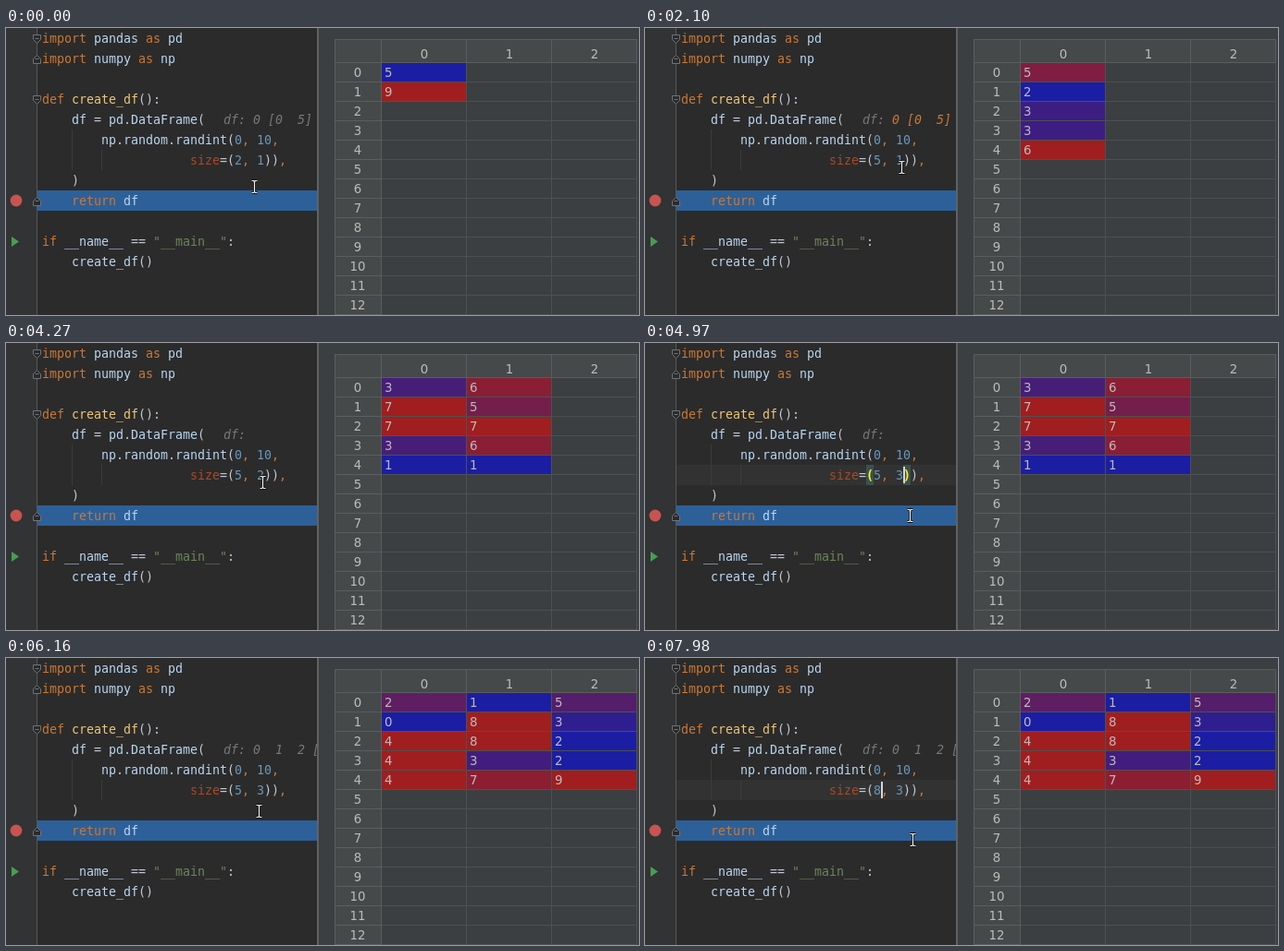
An HTML page that plays this animation: 684x311 px, repeating every 8000 ms.

```html
<!DOCTYPE html>
<html lang="en">
<head>
<meta charset="utf-8">
<title>DataFrame viewer</title>
<style>
  html, body { margin: 0; width: 100%; height: 100%; overflow: hidden; background: #3c3f41; }
  svg { display: block; }
  text { white-space: pre; }
  .code { font: 13.288px "DejaVu Sans Mono", monospace; }
  .hint { font-style: italic; }
  .table { font: 13.33px "DejaVu Sans", sans-serif; fill: #bbbbbb; }
  .mid { text-anchor: middle; }
</style>
</head>
<body>
<svg id="stage" width="684" height="311" viewBox="0 0 684 311"></svg>
<script>
const LOOP = 8000, STEP = 70;
const LEFT = 39, CHAR = 8, LINE = 22;
const COL = 92, ROW = 21, TABLE_X = 406, TABLE_Y = 38;
const C = {
  key: '#cc7832', name: '#b9d7f1', punct: '#c3cad3', num: '#6897bb',
  func: '#f0c674', arg: '#aa4926', str: '#6a8759', hint: '#787878', brace: '#ffef28'
};
const stage = document.getElementById('stage');

function add(tag, attrs, parent = stage) {
  const el = document.createElementNS('http://www.w3.org/2000/svg', tag);
  for (const k in attrs) el.setAttribute(k, attrs[k]);
  return parent.appendChild(el);
}
const rect = (x, y, width, height, fill, parent) => add('rect', { x, y, width, height, fill }, parent);
const path = (d, stroke, fill = 'none', width = 1, parent) =>
  add('path', { d, stroke, fill, 'stroke-width': width }, parent);
function label(x, y, str, cls, fill, parent) {
  const el = add('text', { x, y, class: cls }, parent);
  if (fill) el.setAttribute('fill', fill);
  el.textContent = str;
  return el;
}
const show = (el, on) => el.setAttribute('visibility', on ? 'visible' : 'hidden');
const lineTop = row => row * LINE;
const colX = col => LEFT + col * CHAR;

// Editor background
rect(0, 0, 337, 311, '#2b2b2b');
rect(0, 0, 33, 311, '#313335');
rect(33, 0, 1, 311, '#555759');
const activeLine = rect(34, lineTop(6), 303, LINE, '#323232');
rect(34, lineTop(8), 303, LINE, '#2d6099');
rect(71, lineTop(5), 1, LINE * 2, '#3b3b3b');
rect(103, lineTop(6), 1, LINE, '#3b3b3b');
const braceBoxes = [25, 30].map(c => rect(colX(c), lineTop(6), CHAR, LINE, '#3b514d'));
const selection = rect(0, lineTop(6), CHAR, LINE, '#214283');

// Gutter icons
function fold(row, dir) {
  const y = row * LINE + 12;
  path(`M29.5 ${y - 4.5 * dir}h8v${5 * dir}l-4 ${4 * dir}l-4 ${-4 * dir}z`, '#707376', '#2b2b2b');
  path(`M31.5 ${y - 0.5}h4`, '#707376');
}
fold(0, 1); fold(1, -1); fold(3, 1); fold(8, -1);
add('circle', { cx: 11, cy: 187, r: 6.4, fill: '#c75450' });
path('M6 226L14 231.5L6 237Z', 'none', '#499c54');

// Code: alternating colour name and text
function code(row, col, ...parts) {
  const made = [];
  for (let i = 0; i < parts.length; i += 2) {
    made.push(label(colX(col), lineTop(row) + 16, parts[i + 1], 'code', C[parts[i]]));
    col += parts[i + 1].length;
  }
  return made;
}
code(0, 0, 'key', 'import ', 'name', 'pandas ', 'key', 'as ', 'name', 'pd');
code(1, 0, 'key', 'import ', 'name', 'numpy ', 'key', 'as ', 'name', 'np');
code(3, 0, 'key', 'def ', 'func', 'create_df', 'punct', '():');
code(4, 4, 'name', 'df ', 'punct', '= ', 'name', 'pd', 'punct', '.', 'name', 'DataFrame', 'punct', '(');
code(5, 8, 'name', 'np', 'punct', '.', 'name', 'random', 'punct', '.', 'name', 'randint',
  'punct', '(', 'num', '0', 'key', ', ', 'num', '10', 'key', ',');
const [, , open, first, , second, close] = code(6, 20, 'arg', 'size', 'punct', '=', 'punct', '(',
  'num', '2', 'key', ', ', 'num', '1', 'punct', ')', 'punct', ')', 'key', ',');
code(7, 4, 'punct', ')');
code(8, 4, 'key', 'return ', 'name', 'df');
code(10, 0, 'key', 'if ', 'name', '__name__ ', 'punct', '== ', 'str', '"__main__"', 'punct', ':');
code(11, 4, 'name', 'create_df', 'punct', '()');
label(235, 104, 'df:', 'code hint', C.hint);
const hint = label(235 + 4 * CHAR, 104, '', 'code hint');
const caret = rect(0, 0, 2, 18, '#d6d6d6');

// Table
rect(337, 0, 347, 311, '#3c3f41');
rect(336, 0, 2, 311, '#5f6163');
rect(355, 12, 327, 26, '#45494a');
rect(355, 12, 51, 299, '#45494a');
for (let i = 0; i < 13; i++) {
  const y = TABLE_Y + i * ROW;
  rect(TABLE_X, y + 20, 276, 1, '#4d5052');
  rect(355, y + 20, 51, 1, '#5b5e60');
  label(380, y + 15, i, 'table mid');
}
for (let c = 0; c < 3; c++) {
  const x = TABLE_X + c * COL;
  rect(x + 91, TABLE_Y, 1, 273, '#4d5052');
  rect(x + 91, 12, 1, 26, '#5b5e60');
  label(x + 46, 33, c, 'table mid');
}
path('M355.5 311V12.5H682M355 37.5H682M405.5 12V311', '#5b5e60');

// Each sheet lists its columns, one digit per row
const sheets = ['59', '52336', '37731 65761', '20444 18837 53229'].map(spec => {
  const g = add('g', {});
  spec.split(' ').forEach((digits, c) => {
    const lo = Math.min(...digits), span = Math.max(...digits) - lo;
    [...digits].forEach((d, r) => {
      const k = (d - lo) / span, x = TABLE_X + c * COL, y = TABLE_Y + r * ROW;
      rect(x, y, 91, 20, `rgb(${27 + 133 * k}, 30, ${163 - 132 * k})`, g);
      label(x + 3, y + 15, d, 'table', '#cbcbcb', g);
    });
  });
  return g;
});

// Text pointer
const pointer = add('g', {});
const beam = 'M-3 -6.5H-1L0 -5.5L1 -6.5H3M0 -5.5V5.5M-3 6.5H-1L0 5.5L1 6.5H3';
path(beam, '#111111', 'none', 3, pointer);
path(beam, '#f4f4f4', 'none', 1.2, pointer);

const moves = [
  [0, 268, 172], [350, 252, 150], [630, 252, 150], [840, 272, 175], [980, 278, 164],
  [1050, 278, 164], [1190, 278, 162], [1820, 278, 162], [2100, 277, 151], [2170, 277, 147],
  [2240, 277, 147], [2590, 285, 199], [2940, 289, 188], [3080, 289, 188], [3290, 289, 176],
  [3920, 289, 176], [4270, 277, 151], [4340, 277, 148], [4410, 277, 148], [4620, 286, 187],
  [5040, 286, 187], [5180, 289, 167], [5810, 289, 167], [6160, 273, 166], [6440, 257, 153],
  [6510, 257, 153], [6930, 289, 188], [7420, 289, 188], [7770, 289, 202], [7980, 289, 197]
];

const click = col => ({ row: 6, col, on: true });
const brace = { brace: true };
const select = col => ({ col, sel: true, brace: false });
const type = (slot, digit, col) => ({ [slot]: digit, col, sel: false, on: true });
const run = (hint, tint) => ({ row: 8, col: 0, on: true, brace: false, sheet: -1, hint, tint });
const off = { on: false };

const events = [
  [0, { ...run('0 [0  5]', C.hint), on: false, sel: false, a: 2, b: 1, sheet: 0 }],
  [350, click(27)], [700, { col: 26, brace: true }], [770, select(26)], [910, type('a', 5, 27)],
  [1120, off], [1190, { on: true }],
  [1330, run('0 [0  5]', C.key)], [1400, { sheet: 1 }], [1890, off],
  [2310, click(30)], [2380, brace], [2660, select(29)], [2800, type('b', 2, 30)], [2870, brace],
  [3500, run('', C.hint)], [3570, { sheet: 2 }], [3990, off],
  [4480, click(30)], [4550, brace], [4830, select(29)], [4900, type('b', 3, 30)], [4970, brace],
  [5600, run('0  1  2 [', C.hint)], [5670, { sheet: 3 }], [6090, off],
  [6580, click(27)], [7140, { col: 26, brace: true }], [7210, select(26)], [7490, type('a', 8, 27)]
];

function pointerAt(t) {
  const i = moves.findIndex(m => m[0] > t);
  if (i < 0) return moves[moves.length - 1].slice(1);
  const [t0, x0, y0] = moves[i - 1], [t1, x1, y1] = moves[i];
  const k = (t - t0) / (t1 - t0);
  return [Math.round(x0 + (x1 - x0) * k), Math.round(y0 + (y1 - y0) * k)];
}

function render(t) {
  const s = Object.assign({}, ...events.filter(e => e[0] <= t).map(e => e[1]));
  show(activeLine, s.row === 6);
  show(caret, s.on);
  caret.setAttribute('x', colX(s.col));
  caret.setAttribute('y', lineTop(s.row) + 2);
  show(selection, s.sel);
  selection.setAttribute('x', colX(s.col));
  braceBoxes.forEach(b => show(b, s.brace));
  for (const p of [open, close]) {
    p.setAttribute('fill', s.brace ? C.brace : C.punct);
    p.setAttribute('font-weight', s.brace ? 'bold' : 'normal');
    p.style.fontWeight = s.brace ? 'bold' : 'normal';
  }
  first.textContent = s.a;
  second.textContent = s.b;
  hint.textContent = s.hint;
  hint.setAttribute('fill', s.tint);
  sheets.forEach((g, i) => show(g, i === s.sheet));
  const [x, y] = pointerAt(t);
  pointer.setAttribute('transform', `translate(${x + 0.5} ${y})`);
}

const start = performance.now();
function tick() {
  const t = (performance.now() - start) % LOOP;
  render(Math.floor(t / STEP) * STEP);
  requestAnimationFrame(tick);
}
tick();
</script>
</body>
</html>
```
